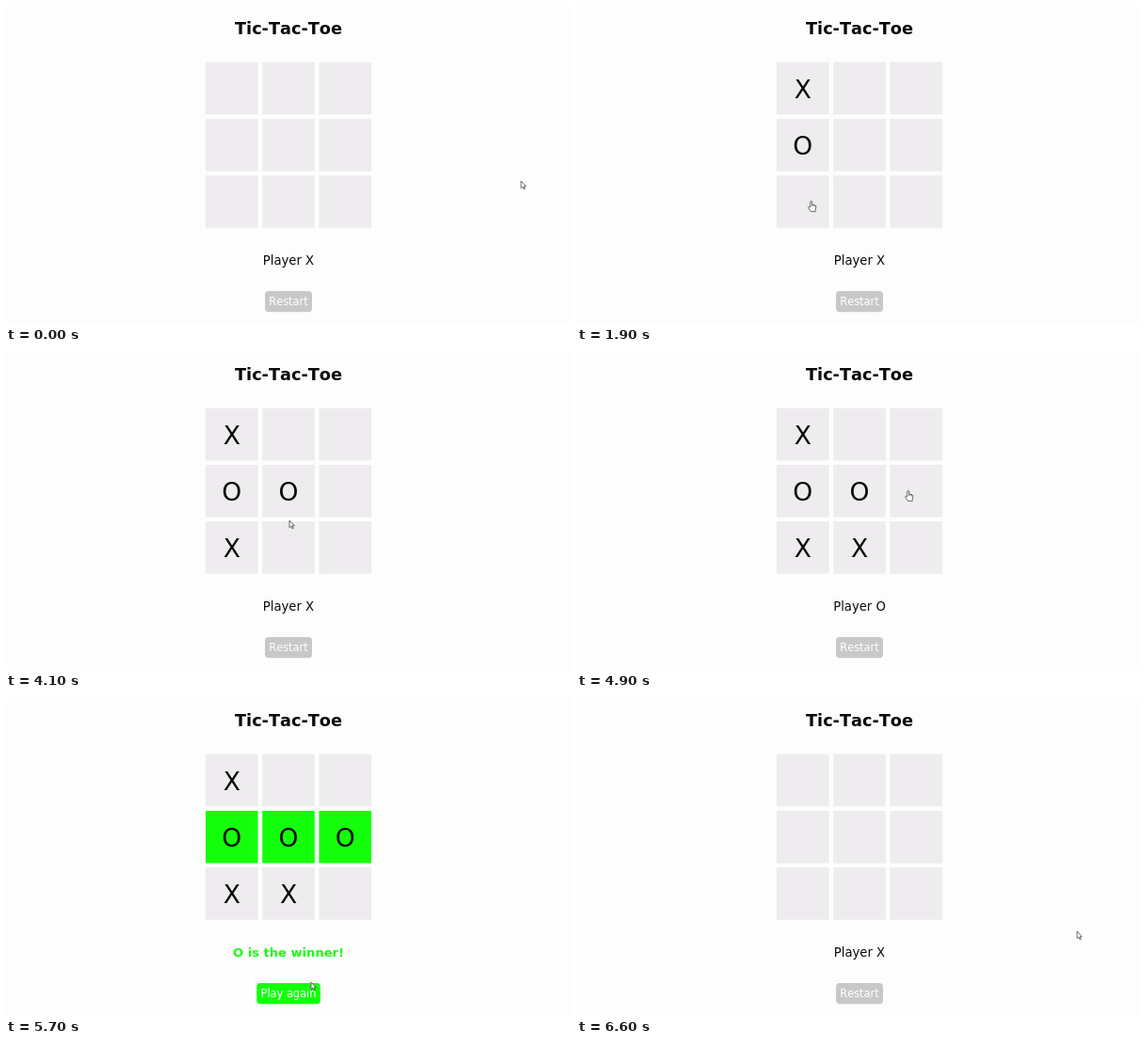
Animation of 600 by 338 pixels, one loop 6.7 s. Source, as an HTML page:

```html
<!DOCTYPE html>
<html lang="en">
<head>
<meta charset="utf-8">
<title>Tic-Tac-Toe</title>
<style>
  html, body { margin: 0; width: 100%; height: 100%; overflow: hidden; background: #fefdfe; }
  svg { display: block; width: 600px; height: 338px; }
  text { font-family: "DejaVu Sans", Verdana, sans-serif; font-kerning: none; text-anchor: middle; fill: #0a0a0a; }
  .title { font-size: 17.7px; font-weight: bold; }
  .cell { fill: #eeecee; }
  .mark { font-size: 26.6px; }
  #status { font-size: 13.2px; }
  #button { fill: #c9c8c9; }
  #label { font-size: 11.4px; fill: #fff; }
  .won .win, .won #button { fill: #14ff0c; }
  .won #status { fill: #14ff0c; font-size: 13.1px; font-weight: bold; }
  #cursor path { fill: #fff; stroke: #444; stroke-width: .8; stroke-linejoin: round; }
</style>
</head>
<body>
<svg id="stage" viewBox="0 0 600 338">
  <text class="title" x="300" y="30.2">Tic-Tac-Toe</text>
  <g id="board"></g>
  <text id="status" x="300" y="274.7"></text>
  <rect id="button" y="303" height="22.2" rx="4"/>
  <text id="label" x="300" y="318.4"></text>
  <g id="cursor">
    <path id="arrow" d="M0 0V7.6L1.8 6.1L3 8.8L4.2 8.3L3 5.7H5.2Z"/>
    <g id="hand">
      <path d="M-1.2 7V.9Q-.3 -.5 .7 .9V4L4 4.8Q5 5.2 4.8 6.8L4.2 9.6V11.4H-.5L-3.3 7.6Q-3.6 5.9 -2.3 6.2Z"/>
      <path d="M.7 4V6M2.3 4.5V6.2M3.8 4.9V6.5" style="stroke-width:.6"/>
    </g>
  </g>
</svg>
<script>
const STEP = 100, LOOP = 6700, RESET = 59;
const SIZE = 55.6, PITCH = 60.2;

// Cells taken by X and O in turn, and the step of each click
const cells = [0, 3, 6, 4, 7, 5];
const clicks = [7, 14, 34, 38, 42, 50];

// Key points of the pointer's tip: step, x, y
const path = [
  [0, 547, 186], [5, 234, 94], [9, 233.5, 104], [19, 249, 207], [33, 249, 207],
  [34, 260, 193], [39, 299, 154], [43, 303, 204], [44, 303, 204], [49, 352, 147],
  [53, 377, 196], [57, 324, 302], [61, 312, 311], [66, 531, 248]
];

const $ = id => document.getElementById(id);
const cellX = i => 300 - SIZE / 2 + (i % 3 - 1) * PITCH;
const cellY = i => 59.7 + Math.floor(i / 3) * PITCH;

function set(el, attrs) {
  for (const key in attrs) el.setAttribute(key, attrs[key]);
  return el;
}

function add(tag, attrs) {
  const el = document.createElementNS("http://www.w3.org/2000/svg", tag);
  return $("board").appendChild(set(el, attrs));
}

const marks = [];
for (let i = 0; i < 9; i++) {
  const x = cellX(i), y = cellY(i), inRow = Math.floor(i / 3) === 1;
  add("rect", { class: inRow ? "cell win" : "cell", x, y, width: SIZE, height: SIZE });
  marks.push(add("text", { class: "mark", x: x + SIZE / 2, y: y + 38.3 }));
}

function pointer(step) {
  const n = Math.max(1, path.findIndex(p => p[0] >= step));
  const [t0, x0, y0] = path[n - 1], [t1, x1, y1] = path[n];
  const k = (step - t0) / (t1 - t0);
  return [x0 + (x1 - x0) * k, y0 + (y1 - y0) * k];
}

const inside = (x, y, l, t, w, h) => x >= l && x <= l + w && y >= t && y <= t + h;

function draw(step) {
  const turns = step < RESET ? clicks.filter(t => t <= step).length : 0;
  const won = turns === clicks.length;
  marks.forEach((mark, i) => {
    const turn = cells.indexOf(i);
    mark.textContent = turn >= 0 && turn < turns ? "XO"[turn % 2] : "";
  });
  set($("stage"), { class: won ? "won" : "" });
  $("status").textContent = won ? "O is the winner!" : "Player " + "XO"[turns % 2];
  $("label").textContent = won ? "Play again" : "Restart";
  const width = won ? 67.6 : 50, left = 300 - width / 2;
  set($("button"), { x: left, width });

  const [x, y] = pointer(step);
  const hot = inside(x, y, left, 303, width, 22) ||
    marks.some((_, i) => inside(x, y, cellX(i), cellY(i), SIZE, SIZE));
  set($("cursor"), { transform: `translate(${x} ${y})` });
  $("hand").style.display = hot ? "" : "none";
  $("arrow").style.display = hot ? "none" : "";
}

let last = -1;
function tick() {
  const step = Math.floor(performance.now() % LOOP / STEP);
  if (step !== last) draw(last = step);
  requestAnimationFrame(tick);
}
tick();
</script>
</body>
</html>
```
